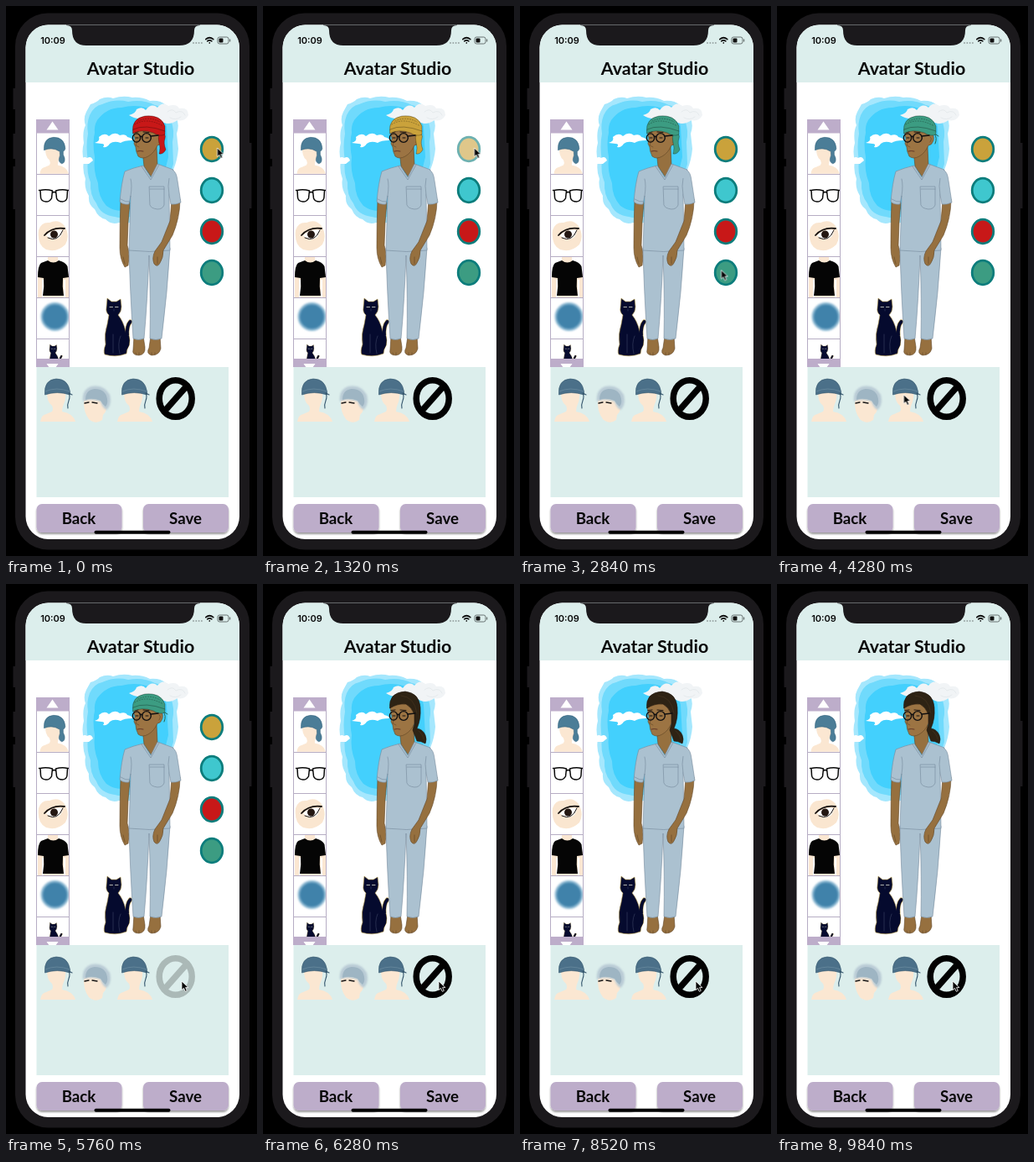
Write an HTML page that moves like this. It is 300 px wide and 655 px high and loops after 9.88 s.

```html
<!DOCTYPE html>
<html lang="en">
<head>
<meta charset="utf-8">
<title>Avatar Studio</title>
<style>
  html, body { margin: 0; width: 100%; height: 100%; overflow: hidden; background: #000; }
  svg { display: block; width: 100%; height: 100%; }
  text { font-family: Lato, sans-serif; font-weight: 700; fill: #080808; }
  .line { fill: none; stroke-linecap: round; stroke-linejoin: round; }
</style>
</head>
<body>
<svg viewBox="0 0 300 655">
  <defs>
    <clipPath id="screen"><rect x="23.500" y="22.500" width="255.500" height="612.500" rx="27"/></clipPath>
    <clipPath id="list"><rect x="36" y="135" width="40" height="295"/></clipPath>
    <filter id="soft" x="-20%" y="-20%" width="140%" height="140%"><feGaussianBlur stdDeviation="1.2"/></filter>
    <filter id="drop" x="-10%" y="-20%" width="120%" height="160%">
      <feDropShadow dx="0" dy="2" stdDeviation="1.3" flood-color="#000" flood-opacity=".4"/>
    </filter>
    <path id="bust" fill="#fbe7d2" d="M0 52Q1 44 7 43L14 40Q16 37 14 33Q7 28 8 14H30Q31 25 28 31Q26 35 26 40Q39 42 42 52Z"/>
    <g id="tieCap">
      <use href="#bust"/>
      <path fill="#4b7089" stroke="#35566c" stroke-width=".6" d="M5.500 20Q4 2 19 1Q33 1 35.500 16V20Q20 15 5.500 20Z"/>
      <path class="line" stroke="#35566c" stroke-width="1.100" d="M34 18Q36 22 34 27T33 36M34 18L38 20"/>
      <path class="line" stroke="#7292a5" stroke-width=".6" d="M6 16Q19 10 35 16"/>
    </g>
    <g id="cat">
      <path class="line" stroke="#b59a4a" stroke-width="5" d="M140 411Q148 404 145 393Q144 381 148.500 376"/>
      <path fill="#050a2e" stroke="#b59a4a" stroke-width=".6" d="M121 348L126 352H132L137 349L138 358Q138 364 134 368Q140 375 143 387Q147 402 144 414Q131 419 118 415Q116 411 119 403Q117 391 121 379L123 368Q119 365 120 359Z"/>
      <path class="line" stroke="#050a2e" stroke-width="4" d="M140 411Q148 404 145 393Q144 381 148.500 376"/>
      <path class="line" stroke="#dfe0d0" stroke-width=".8" d="M124 358.500H127.500M130.500 358.500H134"/>
      <path class="line" stroke="#3d4666" stroke-width=".6" d="M129 361V363M128 391V413M137 393Q133 402 136 414"/>
    </g>
  </defs>

  <g fill="#1b191c">
    <rect x="11" y="8.500" width="280" height="639" rx="39"/>
    <path d="M8.500 98H12V123H8.500ZM8.500 152H12V182H8.500ZM8.500 191H12V242H8.500ZM290 163H293.500V241H290Z"/>
  </g>

  <g clip-path="url(#screen)">
    <rect x="23" y="22" width="257" height="614" fill="#fff"/>
    <rect x="23" y="22" width="257" height="69" fill="#dceeec"/>
    <path fill="#1b191c" d="M72 21V23Q79 23 79 29Q79 47 96 47H207Q225 47 225 29Q225 23 232 23V21Z"/>
    <text x="56" y="45" font-size="11" text-anchor="middle" style="font-family:Inter,sans-serif;font-weight:600">10:09</text>
    <g fill="#9aa5a5">
      <circle cx="224" cy="44" r="1"/><circle cx="227.300" cy="44" r="1"/>
      <circle cx="230.600" cy="44" r="1"/><circle cx="233.900" cy="44" r="1"/>
    </g>
    <g class="line" stroke="#111" stroke-width="1.700">
      <path d="M238.800 39.600Q243.300 35.900 247.800 39.600M240.700 41.800Q243.300 39.800 245.900 41.800"/>
      <path d="M243.300 43.800V44"/>
    </g>
    <rect x="253" y="37" width="13" height="8" rx="2.200" fill="none" stroke="#687272"/>
    <rect x="254.500" y="38.500" width="5" height="5" rx="1" fill="#111"/>
    <path d="M267.700 39.500V42.500" stroke="#687272" stroke-width="1.200"/>
    <text x="161" y="81.700" font-size="21.400" text-anchor="middle">Avatar Studio</text>

    <!-- sky -->
    <path fill="#a5e7fd" d="M96 126L101 117Q108 115 112 111Q121 107 128 110Q140 106 151 109Q162 108 172 113Q185 112 191 118Q201 121 203 132Q208 141 204 152L206 170Q205 183 200 195L190 236Q181 252 160 253Q147 261 135 258Q126 261 119 254Q110 252 106 242Q98 237 99 226Q93 216 95 206Q91 196 93 185Q90 173 93 163Q91 150 95 142Q92 134 96 126Z"/>
    <path fill="#70dafc" d="M100 130Q105 119 115 117Q131 110 146 114Q164 111 178 118Q193 121 197 136Q202 148 199 162L200 188L188 230Q176 247 156 248Q142 255 130 251Q113 249 108 235Q100 225 101 210Q96 198 98 184Q95 168 98 152Q96 140 100 130Z"/>
    <path fill="#43d0fd" d="M109 136Q120 121 138 121Q158 116 175 124Q189 129 192 144L194 180L183 225Q170 241 152 241Q134 248 120 238Q110 227 110 211Q104 196 106 180Q103 163 106 151Q105 143 109 136Z"/>
    <g fill="#fff">
      <path d="M106 163Q113 161 111 156Q118 150 123 155Q130 149 136 154Q143 152 145 156Q151 157 151 160Q141 160 137 163Q129 160 124 164Q121 169 116 168Q119 164 114 164Z"/>
      <path d="M89 185Q92 178 97 181Q102 178 104 184L99 188H91Z"/>
      <path fill="#f1f4f6" d="M147 130Q155 128 156 123Q163 119 167 124Q174 115 181 121Q187 113 194 119Q204 116 207 122Q218 120 218 130Q214 138 205 136Q193 144 184 136Q172 140 165 133Q156 136 147 130Z"/>
      <path class="line" stroke="#e2e7ea" stroke-width=".8" d="M193 126Q199 121 203 127Q211 123 214 130M196 133Q203 137 209 132"/>
    </g>

    <use href="#cat"/>

    <!-- person -->
    <g stroke="#604526" stroke-width=".6" stroke-linejoin="round">
      <g fill="#96703f">
        <path d="M137 231L148 234L146 258L145 285Q148 294 146 309L142 311Q136 301 136 288Q136 258 137 231Z"/>
        <path d="M153 393H164L166 406Q167 415 159 416Q150 416 152 409Z"/>
        <path d="M173 393H184L185 408Q183 416 174 416Q167 414 171 407Z"/>
        <path class="line" d="M155 413L156 415M159 413V415M174 413V415M178 413V415M140 299L142 307"/>
        <path d="M163 172L180 167L181 190L174 204L165 191Z"/>
      </g>
      <g fill="#abc1d0" stroke="#74899a">
        <path d="M147 288H196Q193 340 186 396Q179 399 172 396Q173 350 171 297Q169 351 165 396Q158 399 152 396Q148 337 147 288Z"/>
        <path d="M164 190L173 204L181 188Q192 192 200 195L195 225L196 291Q171 294 147 291L149 226L147 236Q140 237 136 233Q138 210 142 197Q151 193 164 190Z"/>
        <path class="line" d="M162 191L173 207L183 189M171.500 215H189V237Q187 242 181 242Q173 241 172 237ZM172 218H189M149 226Q151 213 149 206M137 230Q143 234 148 233"/>
      </g>
      <path fill="#96703f" d="M198 232L208 230Q208 252 199 273L188 291Q188 300 184 306Q181 312 177 307Q174 300 178 292L186 281L196 256Z"/>
      <path class="line" d="M181 299V307"/>
      <path fill="#abc1d0" stroke="#74899a" d="M199 195Q204 198 205 208L209 234Q203 237 197 236L195 225Q193 214 195 205"/>
      <path fill="#9c7443" d="M152 147Q160 136 182 143L185 153Q188 153 187 160Q185 166 181 166Q177 175 170 179Q163 183 158 179Q155 173 155 168L153 164L154 158Z"/>
      <path class="line" d="M183 156Q186 157 183 162M157 160L155 166L159 168"/>
    </g>
    <path class="line" stroke="#633728" d="M157 173Q160 172 164 173"/>
    <path class="line" stroke="#221812" d="M153 150.500L158 150M164 150L171 150.500"/>

    <g id="hair" fill="#2e2314" stroke="#20160f" stroke-width=".6">
      <path d="M151.500 148Q150 129 170 128Q187 130 188 147Q189 161 184 172Q191 173 194 180Q196 185 194 190Q189 187 184 187L179 174L181 167V155Q177 146 171 143Q161 142 151.500 148Z"/>
      <path class="line" stroke="#493620" d="M165 133Q181 134 184 154M186 175Q191 179 192 185"/>
    </g>
    <g id="cap" stroke="#00000066" stroke-width=".7">
      <path id="tail" d="M184 151Q192 151 190 158Q188 163 191 171Q188 177 183 176Q185 169 183 163Q181 156 184 151Z"/>
      <path id="strings" class="line" style="stroke:#24634f" stroke-width="1" d="M188 152Q192 157 189 164M188 152L193 155"/>
      <path d="M151.500 150Q150 134 166 131Q185 129 190 143L190 153Q183 156 176 151Q162 146 151.500 152Z"/>
      <path class="line" d="M152 147Q166 140 190 149"/>
      <path class="line" stroke-dasharray="1 2" d="M154 141Q168 132 188 143M158 137Q171 131 184 138"/>
    </g>
    <g class="line" stroke="#100f10" stroke-width="1.400">
      <ellipse cx="156" cy="157" rx="4.600" ry="5.100"/>
      <ellipse cx="168" cy="157" rx="5.300" ry="5.400"/>
      <path d="M160.500 156Q161.500 154.500 162.800 156M173 155L182 154"/>
      <path stroke-width="1" d="M155 157H158M167 157H170"/>
    </g>

    <!-- category list -->
    <g clip-path="url(#list)">
      <g transform="translate(40.500 155.500) scale(.82 .85)">
        <use href="#bust"/>
        <path fill="#4b7d97" stroke="#315f78" stroke-width=".6" d="M6 19Q5 2 20 1Q36 1 37 17Q36 20 34 21Q33 25 36 30Q37 37 32 38Q27 36 28 31Q30 26 29 21Q18 14 6 19Z"/>
      </g>
      <path class="line" stroke="#090909" stroke-width="1.500" d="M41 219.500Q48 218 55.500 220L54.500 229Q52 233.500 47.500 233Q42 232.500 41.500 228ZM59.500 220Q67 218 73.500 219.500L73 228Q72.500 232.500 67.500 233Q62 233 60.500 229ZM55.500 222.500Q57.500 220.500 59.500 222.500M39.500 219.500H41M73.500 219.500H75"/>
      <path fill="#fae6d0" d="M39 267Q42 257 52 258Q63 253 70 262Q77 274 71 284Q61 294 48 290Q37 285 39 267Z"/>
      <path fill="#fff" d="M48 273Q57 265 68 267Q67 277 58 278Q52 278 48 273Z"/>
      <circle cx="57.500" cy="272" r="4.500" fill="#241712"/>
      <path class="line" stroke="#120d0b" stroke-width="1.800" d="M46 273Q55 263 70 265"/>
      <path class="line" stroke="#120d0b" d="M50 276Q62 282 68 267"/>
      <path fill="#fbe7d2" d="M38 347V320L50 304V298H62V304L75 320V347Z"/>
      <path fill="#fff" d="M45 347V326H43V347ZM69 347V326H71V347Z"/>
      <path fill="#050505" d="M50 303Q56.500 308 63 303Q71 305 73.500 310L75 323L68 324Q67 334 69 345H44Q46 334 45 324L38 323Q38 309 42 306Z"/>
      <circle cx="58.500" cy="370" r="17" fill="#8eb9d3" filter="url(#soft)"/>
      <circle cx="58.500" cy="370" r="14.500" fill="#3f82aa" filter="url(#soft)"/>
      <use href="#cat" transform="translate(-8 229) scale(.5)"/>
      <path class="line" stroke="#b6adc4" d="M36.500 135V430M75.500 135V430M36 200.500H76M36 249.500H76M36 298.500H76M36 347.500H76M36 396.500H76"/>
      <path fill="#bdadca" d="M36 135H76V151.500H36ZM36 420H76V430H36Z"/>
      <path fill="#fff" d="M55.500 137.500L62.500 147.500H48.500ZM48.500 426H62.500L55.500 436Z"/>
    </g>

    <rect x="36.500" y="430" width="229.500" height="155" fill="#dceeec"/>
    <use href="#tieCap" x="41" y="443"/>
    <g>
      <path fill="#fbe7d2" d="M93 468H121Q122 482 116 487L115 493Q107 499 99 492Q92 483 93 468Z"/>
      <path fill="#b9cbd5" filter="url(#soft)" d="M92 471Q90 457 102 453Q117 450 124 463Q127 475 120 481Q115 478 113 471Q101 467 92 471Z"/>
      <path fill="#9eb5c3" d="M95 469Q95 457 106 456Q119 456 121 468Q122 474 119 477Q115 474 113 470Q103 466 95 469Z"/>
      <path class="line" stroke="#151515" stroke-width="1.300" d="M94 473L99 472M103 472L109 473"/>
    </g>
    <g id="cap3"><use href="#tieCap" x="133" y="443"/></g>
    <g id="none" class="line" stroke="#020202" stroke-width="7.500">
      <ellipse cx="202.700" cy="467.500" rx="19.500" ry="21.800"/>
      <path stroke-linecap="butt" d="M216.500 452L189 483"/>
    </g>

    <g id="swatches" stroke="#0c7d7c" stroke-width="2.800"></g>

    <g fill="#bdadca" filter="url(#drop)">
      <rect x="36.500" y="593" width="102" height="34" rx="6.500"/>
      <rect x="164" y="593" width="102" height="34" rx="6.500"/>
    </g>
    <g font-size="18.700" text-anchor="middle">
      <text x="87" y="616.700">Back</text>
      <text x="214.500" y="616.700">Save</text>
    </g>
    <rect x="105.500" y="624.700" width="91" height="4" rx="2" fill="#020202"/>
  </g>

  <path id="cursor" fill="#050505" stroke="#fff" stroke-width=".8" d="M0 0V10.500L2.500 8.300L4.300 12.300L6.300 11.400L4.600 7.600H8Z"/>
</svg>

<script>
const LOOP = 9880;
const $ = id => document.getElementById(id);
const GOLD = '#caa23b', RED = '#c81818', GREEN = '#3c9c82';

// steps: [time in ms, value, easing to the next step]
function play(el, prop, steps) {
  const first = steps[0], last = steps[steps.length - 1];
  const all = first[0] ? [[0, first[1]], ...steps] : steps;
  const frames = [...all, [LOOP, last[1]]].map(([t, value, easing = 'linear']) =>
    ({ offset: t / LOOP, [prop]: value, easing }));
  el.animate(frames, { duration: LOOP, iterations: Infinity });
}

// swap from one value to the next without a blend
function hold(el, prop, steps) {
  play(el, prop, steps.map(([t, value]) => [t, value, 'step-end']));
}

function press(el, down, up) {
  play(el, 'opacity', [[down, 1], [down + 80, .22], [up, .22], [up + 250, 1]]);
}

const swatches = [GOLD, '#3fc7ce', RED, GREEN].map((color, i) => {
  const dot = document.createElementNS('http://www.w3.org/2000/svg', 'ellipse');
  const attrs = { cx: 246, cy: 170.5 + 49 * i, rx: 12.8, ry: 14.3, fill: color };
  for (const key in attrs) dot.setAttribute(key, attrs[key]);
  return $('swatches').appendChild(dot);
});

const PICK = { gold: 1200, green: 2500, third: 4000, none: 5840 };

press(swatches[0], PICK.gold - 140, PICK.gold);
press(swatches[3], PICK.green - 140, PICK.green);
press($('cap3'), PICK.third - 140, PICK.third);
press($('none'), PICK.none - 200, PICK.none);

hold($('cap'), 'fill', [[0, RED], [PICK.gold, GOLD], [PICK.green, GREEN]]);
hold($('tail'), 'opacity', [[0, 1], [PICK.third, 0]]);
hold($('strings'), 'opacity', [[0, 0], [PICK.third, 1]]);
hold($('hair'), 'opacity', [[0, 0], [PICK.none, 1]]);
for (const id of ['cap', 'swatches']) hold($(id), 'opacity', [[0, 1], [PICK.none, 0]]);

const at = (x, y) => `translate(${x}px, ${y}px)`;
const gold = at(252.5, 169), green = at(240.5, 314.5);
const third = at(151.5, 463), none = at(210, 473);
play($('cursor'), 'transform', [
  [0, gold], [1600, gold, 'ease-in-out'],
  [2240, green], [3000, green, 'ease-in-out'],
  [3720, third], [4640, third, 'ease-in-out'],
  [5360, none]
]);
</script>
</body>
</html>
```
